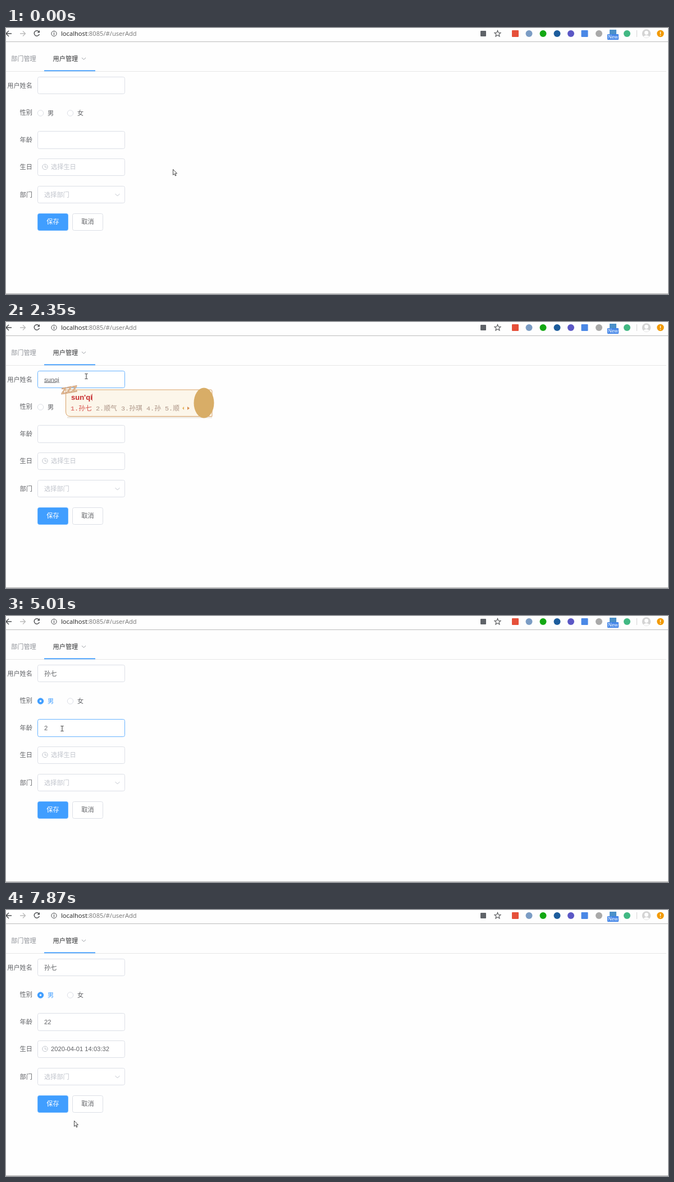
These frames come from a looping animation (1179 px wide and 475 px high, 7.99 s). An HTML page:

```html
<!DOCTYPE html>
<html lang="zh">
<head>
<meta charset="utf-8">
<title>用户管理</title>
<style>
html, body { margin: 0; width: 100%; height: 100%; overflow: hidden; background: #fefefe; }
svg { display: block; }
text { font-family: "Open Sans", "Noto Sans CJK SC", "Noto Sans CJK", sans-serif; font-size: 11.2px; white-space: pre; }
.arial { font-family: "Liberation Sans", "Noto Sans CJK SC", "Noto Sans CJK", sans-serif; }
.mono { font-family: "Liberation Mono", "Noto Sans CJK SC", "Noto Sans CJK", monospace; font-size: 11.8px; font-weight: 300; }
</style>
</head>
<body>
<svg width="1179" height="475"><g id="page"></g><g id="live"></g></svg>
<script>
const LOOP = 7990;
const BLUE = '#409eff', RIM = '#68b3ff', DARK = '#606266', PALE = '#c0c4cc', EDGE = '#dcdfe6', FADE = '#9cc2ea';

const text = (x, y, s, fill = DARK, extra = '') => `<text x="${x}" y="${y}" fill="${fill}" ${extra}>${s}</text>`;
const rect = (x, y, w, h, fill, stroke = 'none', r = 0) =>
  `<rect x="${x}" y="${y}" width="${w}" height="${h}" rx="${r}" fill="${fill}" stroke="${stroke}"/>`;
const circle = (x, y, r, fill, stroke = 'none') => `<circle cx="${x}" cy="${y}" r="${r}" fill="${fill}" stroke="${stroke}"/>`;
const path = (d, stroke, w = 1, fill = 'none') => `<path d="${d}" fill="${fill}" stroke="${stroke}" stroke-width="${w}"/>`;
const field = (y, edge, h = 30) => rect(56.5, y + .5, 155, h, '#fff', edge, 3);
const caret = (x, y) => rect(x, y, 1, 13, '#333');

// Last entry of a track whose start time has passed.
const at = (track, t) => track.filter(k => k[0] <= t).pop();
const within = (t, a, b) => t >= a && t < b;

const cursorTrack = [
  [0, 'arrow', 297, 252], [120, 'arrow', 272, 218], [260, 'arrow', 219, 161], [400, 'beam', 161, 111],
  [540, 'beam', 143, 97], [3150, 'beam', 130, 106], [3280, 'arrow', 98, 132], [3420, 'hand', 70, 150],
  [3700, 'arrow', 76, 163], [3830, 'arrow', 91, 177], [3970, 'beam', 100, 201], [5560, 'beam', 106, 207],
  [5690, 'arrow', 118, 228], [5820, 'beam', 125, 252], [6200, 'arrow', 146, 290],
  [6330, 'arrow', 185, 346], [6460, 'hand', 226, 410], [6580, 'hand', 246, 453], [6850, 'hand', 213, 399],
  [6990, 'hand', 182, 398], [7120, 'hand', 222, 456], [7270, 'arrow', 270, 560],
  [7720, 'arrow', 200, 438], [7870, 'arrow', 121, 376]
];
const nameEdge = [[0, EDGE], [400, PALE], [930, FADE], [1050, RIM], [3550, FADE], [3700, EDGE]];
const ageEdge = [[0, EDGE], [4090, PALE], [4210, FADE], [4330, RIM], [6080, EDGE]];
const birthEdge = [[0, EDGE], [5820, PALE], [6080, RIM], [7580, EDGE]];
const nameText = [[0, ''], [1640, 's'], [1790, 'su'], [2200, 'sun'], [2350, 'sunqi'], [2780, '孙七']];
const ageText = [[0, ''], [5010, '2'], [5160, '22']];
// time, scale, opacity
const panelTrack = [[0, 0, 0], [5950, .22, .25], [6080, .94, .94], [6200, 1, 1], [7430, .7, .5], [7580, 0, 0]];
const candidates = {
  s: ['是', '说', '上', '时'], su: ['苏', '素', '速', '诉'],
  sun: ['孙', '损', '笋', '荪', '隼'], sunqi: ['孙七', '顺气', '孙琪', '孙', '顺']
};

function browserBar() {
  const icons = [
    [907, '#e6503a', 1], [931.5, '#7b9cc4'], [956.5, '#13a813'], [981.5, '#1c5c9c'], [1006, '#5b57c5'],
    [1030.5, '#4a88e6', 1], [1056, '#a9a9a9'], [1106, '#41b883']
  ];
  return path('M0 10H10M5 5L0 10 5 15', '#4b4d50', 1.4) +
    path('M25 10H34M30 5.500L34.500 10 30 14.500', '#bbb', 1.3) +
    path('M58.800 6.800A4.700 4.700 0 1 0 59.400 11', '#4b4d50', 1.4) + path('M60 4V8.500H55.500Z', 'none', 0, '#4b4d50') +
    circle(85.5, 10, 4.6, 'none', '#4b4d50') + path('M85.500 9V12.600M85.500 7V8.200', '#4b4d50', 1.2) +
    text(98, 14, 'localhost<tspan fill="#777">:8085/#/userAdd</tspan>', '#222') +
    rect(845, 5, 10, 10, '#5f6368', 'none', 1) +
    path('M875.500 4.500L877 8.200 881 8.500 878 11.100 879 15 875.500 12.900 872 15 873 11.100 870 8.500 874 8.200Z', '#505255', 1.1) +
    icons.map(([x, fill, square]) => square ? rect(x - 6, 4, 12, 12, fill, 'none', 1) : circle(x, 10, 6, fill)).join('') +
    rect(1075, 3, 12, 8, '#4b90c8') + rect(1071, 11, 20, 10, '#4285e8', 'none', 1) +
    text(1081, 19, 'New', '#fff', 'text-anchor="middle" style="font-size:8.5px"') +
    path('M1123.500 4V16', '#d5d5d5') +
    circle(1140.5, 10, 7.7, '#d4d4d4') + circle(1140.5, 8.5, 3.4, '#fff') +
    path('M1135 15.500Q1140.500 10 1146 15.500Q1140.500 19 1135 15.500', 'none', 0, '#fff') +
    circle(1165.5, 10, 6.2, '#f29900') + path('M1165.500 6.500V11M1165.500 12.500V14', '#fff', 1.4) +
    path('M0 24.500H1179', '#bcbcbc') + path('M0 474.500H1179', '#aaa');
}

function staticPage() {
  const labels = [['用户姓名', 106.5], ['性别', 155], ['年龄', 203.5], ['生日', 252], ['部门', 301.5]];
  return browserBar() +
    text(9, 58.5, '部门管理', '#909399') + text(83.5, 58.5, '用户管理', '#303133') +
    path('M135 53L138.500 56.500 142 53', '#909399', .9) +
    path('M0 77.500H1176', '#e6e6e6') + rect(68, 75.4, 91, 1.8, BLUE) +
    labels.map(([s, y]) => text(47, y, s, DARK, 'text-anchor="end"')).join('') +
    field(282, EDGE) + text(68, 301.5, '选择部门', PALE) + path('M194.500 296L198.500 300 202.500 296', PALE) +
    rect(56.5, 331.5, 54, 30, BLUE, RIM, 3) + text(83.5, 350, '保存', '#fff', 'text-anchor="middle"') +
    rect(118.5, 331.5, 54, 30, '#fff', EDGE, 3) + text(145.5, 350, '取消', DARK, 'text-anchor="middle"') +
    circle(114.5, 152, 5.2, '#fff', EDGE) + text(127, 156, '女');
}

function form(t) {
  const name = at(nameText, t)[1], typing = name in candidates;
  const checked = t >= 3550, dated = t >= 6990;
  let s = field(87, at(nameEdge, t)[1]) + field(184, at(ageEdge, t)[1], 31) + field(233, at(birthEdge, t)[1]);
  s += text(68, 106.5, name, DARK, `class="arial" ${typing ? 'text-decoration="underline"' : ''}`);
  s += text(68, 203.5, at(ageText, t)[1], DARK, 'class="arial"');
  s += circle(69.5, 248, 4.7, 'none', PALE) + path('M69.500 245V248.500H72.500', PALE);
  s += dated ? text(80, 252, '2020-04-01 14:03:32', DARK, 'class="arial"') : text(80, 252, '选择生日', PALE);
  s += circle(61.5, 152, 5.2, checked ? BLUE : '#fff', checked ? BLUE : EDGE);
  if (checked) s += circle(61.5, 152, 1.8, '#fff');
  s += text(74, 156, '男', checked ? BLUE : DARK);
  if (within(t, 930, 1330)) s += caret(68, 96);
  if (within(t, 2780, 3550)) s += caret(91, 96);
  if (within(t, 4210, 4730)) s += caret(68, 193);
  if (within(t, 5950, 6460)) s += caret(80, 242);
  return s + (typing ? inputMethod(name) : '');
}

function inputMethod(word) {
  const shift = word.length < 3 ? -52 : 0;
  const words = candidates[word];
  let x = 115;
  const list = words.map((w, i) => {
    const item = text(x, 158, `${i + 1}.${w}`, i ? '#ab9385' : '#d6504a', 'class="mono"');
    x += 21 + 12 * w.length;
    return item;
  }).join('');
  const typed = word === 'sunqi' ? "sun'qi" : word;
  const end = 117 + { s: 7, su: 15, sun: 23, sunqi: 36 }[word];
  return path(`M109 170.500H${367 + shift}`, '#e9e3da', 2) +
    path(`M106.500 121H${365 + shift}Q${367 + shift} 121 ${367 + shift} 124V168.500H114Q106.500 168 106.500 160Z`, '#d9a268', 1, '#fcf6ea') +
    `<g transform="rotate(-10 113 120)">${text(98, 126.5, 'ZZZ', '#f2cfa6', 'class="arial" stroke="#c4906a" stroke-width=".8" style="font:italic bold 15.5px Liberation Sans,sans-serif"')}</g>` +
    text(116, 139, typed, '#c7292b', 'class="arial" style="font-size:13px;font-weight:bold"') +
    rect(end, 128, 1, 13, '#d98080') + list +
    path(`M${317 + shift} 151V157L${314 + shift} 154Z`, 'none', 0, '#e5b45f') +
    path(`M${323 + shift} 151V157L${327 + shift} 154Z`, 'none', 0, '#d98c50') +
    `<ellipse cx="${352.5 + shift}" cy="144.500" rx="18" ry="27" fill="#d8ad67"/>`;
}

function panel(t) {
  const [, scale, alpha] = at(panelTrack, t);
  if (!alpha) return '';
  const picked = t >= 6990;
  const small = 'style="font-size:9.6px"', mid = 'text-anchor="middle" style="font-size:9.4px"';
  const colX = i => 84.5 + 32.4 * i;
  let s = rect(55, 273, 255, 352, '#f4f5f7', 'none', 4) + rect(56.5, 273.5, 251, 350, '#fff', '#e4e7ed', 3) +
    path('M84 274L89 268.500 94 274', '#edf0f4', 1, '#fff') +
    rect(65.5, 280.5, 112, 24, '#fff', '#e2e5eb', 3) + rect(186.5, 280.5, 112, 24, '#fff', '#e2e5eb', 3) +
    (picked ? text(77, 296.5, '2020-04-01', DARK, small + ' class="arial"') + text(198, 296.5, '14:03:32', DARK, small + ' class="arial"')
      : text(77, 296.5, '选择日期', PALE, small) + text(198, 296.5, '选择时间', PALE, small)) +
    path('M57 309.500H307', '#e4e7ed') +
    path('M75.500 327L72.500 330.500 75.500 334M79 327L76 330.500 79 334M95.500 327L92.500 330.500 95.500 334' +
      'M268.500 327L271.500 330.500 268.500 334M285.500 327L288.500 330.500 285.500 334M289 327L292 330.500 289 334', DARK, .9) +
    text(144, 335, '2020 年', DARK, 'style="font-size:12.8px"') + text(197, 335, '4 月', DARK, 'style="font-size:12.8px"') +
    [...'日一二三四五六'].map((d, i) => text(colX(i), 372.5, d, DARK, mid)).join('') +
    path('M68 384.500H296', '#ebeef5');
  for (let i = 0; i < 42; i++) {
    const n = i - 2, inMonth = n > 0 && n < 31;
    const day = n < 1 ? 31 + n : n > 30 ? n - 30 : n;
    const x = colX(i % 7), y = 400 + 30 * Math.floor(i / 7);
    const hover = n === 17 && within(t, 6580, 6990);
    if (n === 1 && picked) s += circle(x, y, 9.6, BLUE);
    const fill = n === 1 ? (picked ? '#fff' : BLUE) : hover ? BLUE : inMonth ? DARK : PALE;
    s += text(x, y + 3.5, day, fill, mid + (n === 1 ? ' font-weight="bold"' : ''));
  }
  s += path('M57 594.500H307', '#e4e7ed') + text(234, 612, '此刻', BLUE, small) +
    rect(264.5, 599.5, 36, 18, '#fff', EDGE, 2) + text(273, 612, '确定', DARK, small);
  return `<g opacity="${alpha}" transform="translate(0 273) scale(1 ${scale}) translate(0 -273)">${s}</g>`;
}

const pointers = {
  arrow: path('M.500 .500V10.500L2.800 8.300 4.500 12 6 11.300 4.400 7.700H7.500Z', '#333', .9, '#fff'),
  beam: path('M-2.500 -4.500H-.5L0 -4 .5 -4.500H2.500M0 -4V4M-2.500 4.500H-.5L0 4 .5 4.500H2.500', '#333', 1),
  hand: path('M0 1Q1 -.5 2 1V5L6.500 6Q8.500 6.500 8 9.500L6.500 14.500H1L-2.500 9.500Q-3 7.500 0 9Z', '#333', 1, '#fff')
};

function pointer(t) {
  const [, kind, x, y] = at(cursorTrack, t);
  return `<g transform="translate(${x} ${y})">${pointers[kind]}</g>`;
}

const live = document.getElementById('live');
document.getElementById('page').innerHTML = staticPage();
let shown = '';
function draw(now) {
  const t = now % LOOP;
  const next = form(t) + panel(t) + pointer(t);
  if (next !== shown) live.innerHTML = shown = next;
}
const start = performance.now();
function tick() {
  draw(performance.now() - start);
  requestAnimationFrame(tick);
}
tick();
</script>
</body>
</html>
```
